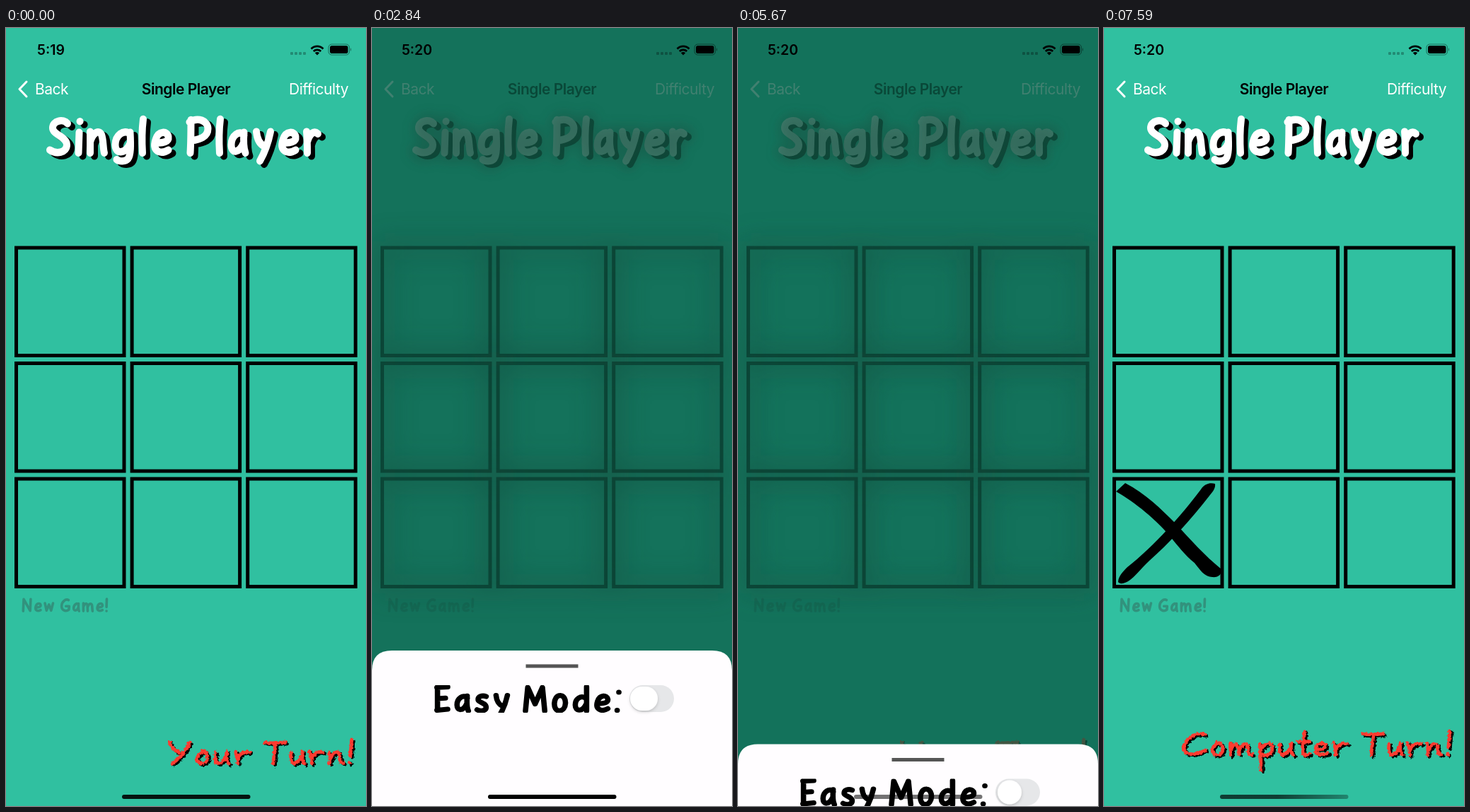
Animation, 509 px wide and 1101 px high, one loop 8 s. Source, as an HTML page:

```html
<!DOCTYPE html>
<html lang="en">
<head>
<meta charset="utf-8">
<title>Tic-tac-toe</title>
<style>
  html, body { margin: 0; width: 100%; height: 100%; overflow: hidden; background: #30c0a0; }
  svg { display: block; width: 100%; height: 100%; }
  text { font-family: Inter, "Open Sans", sans-serif; font-size: 21px; letter-spacing: -.5px; }
  .pen { fill: none; stroke-linecap: round; stroke-linejoin: round; }
</style>
</head>
<body>
<svg id="stage" viewBox="0 0 509 1101" xmlns="http://www.w3.org/2000/svg"></svg>
<script>
const LOOP = 8000, FPS = 12;

// Pen lettering: [width, centre line], baseline at 0
const MARKER = {
  S: [36, 'M30-45C24-52 9-49 9-39C9-30 29-27 29-16C29-5 14-3 5-9'],
  i: [11, 'M6-33L5-5M7-48h.1'],
  n: [31, 'M6-34V-5M6-20C10-33 18-37 22-30C25-22 24-12 26-5'],
  g: [34, 'M27-31C18-38 6-29 6-16C6-3 20-3 27-18M27-33C28-15 28-2 24 3C20 7 12 7 8 4'],
  l: [12, 'M7-51C5-35 5-20 6-5'],
  e: [31, 'M8-19C18-18 27-20 26-27C25-35 12-36 8-23C3-8 14-2 26-9'],
  P: [38, 'M8-50C8-35 8-20 7-5M6-47C18-54 32-49 32-38C32-27 20-23 9-22'],
  a: [31, 'M24-29C18-37 6-29 6-16C6-4 17-4 23-18M24-33C23-20 23-12 26-5'],
  y: [31, 'M6-34C7-24 11-17 17-14M26-34C23-20 18-6 11 6'],
  r: [27, 'M6-34C7-24 7-14 7-5M7-20C10-31 16-36 22-31'],
  N: [40, 'M6-5L8-49L32-6L34-49'],
  w: [42, 'M6-34L12-7L21-29L29-7L36-34'],
  G: [40, 'M32-46C20-52 6-38 6-24C6-6 24-2 33-10L34-23H22'],
  m: [46, 'M6-34V-5M6-20C10-33 18-36 21-28L22-5M22-20C27-33 35-36 38-27L40-5'],
  '!': [11, 'M6-50L5-20M5-5h.1'],
  E: [30, 'M7-50V-6M6-49L25-50M7-28L21-29M6-6L25-8'],
  s: [27, 'M21-32C14-35 6-32 7-25C9-20 21-20 21-12C21-5 12-3 5-7'],
  M: [46, 'M6-5L10-49L23-18L36-49L40-5'],
  o: [31, 'M16-34C3-34 2-5 14-5C28-5 29-33 16-34'],
  d: [32, 'M25-28C16-36 6-27 6-16C6-3 19-3 25-17M26-50L26-5'],
  ':': [14, 'M9-40h.1M6-6h.1'],
  ' ': [10, '']
};
const CHALK = {
  Y: [33, 'M2-33C5-25 10-20 16-18M31-32C24-18 15-8 6-2'],
  o: [20, 'M12-19C1-17-1-3 9-2C19-2 21-18 10-20'],
  u: [23, 'M3-18C1-6 4-1 9-3C15-5 18-12 19-19C18-10 19-4 22-2'],
  r: [24, 'M3-19C6-12 6-7 6-2M6-10C10-17 15-20 22-18'],
  T: [33, 'M2-32C12-30 20-32 31-32M17-31C16-20 14-10 14-2'],
  n: [25, 'M3-18C5-12 5-8 4-2M5-9C11-21 18-21 18-12C18-6 20-2 23-3'],
  '!': [9, 'M7-36L5-13M4-3h.1'],
  C: [36, 'M33-31C22-36 3-25 3-12C3 1 22-3 33-9'],
  m: [36, 'M3-18L4-2M4-9C8-20 15-21 16-3M17-10C22-21 28-20 28-12C28-6 30-2 34-3'],
  p: [25, 'M4-18C6 0 6 10 6 19M6-10C12-21 23-21 22-11C21-3 13 0 7-3'],
  t: [18, 'M10-35C8-20 6-5 9-3C11-1 14-2 17-4M1-21H17'],
  e: [21, 'M4-10C12-9 18-12 17-17C14-21 3-19 3-10C3-1 14-1 20-5']
};

function letter(word, font, gap) {
  let x = 0;
  return [...word].map(ch => {
    const [width, d] = font[ch];
    const glyph = `<path d="${d}" transform="translate(${x.toFixed(1)})"/>`;
    x += width + gap;
    return glyph;
  }).join('');
}
const pen = (marks, x, y, color, width, sx = 1, sy = sx) =>
  `<g class="pen" stroke="${color}" stroke-width="${width}" transform="translate(${x} ${y}) scale(${sx} ${sy})">${marks}</g>`;

function chalkLine(id, y, words) {
  const layer = (dx, dy, color) =>
    words.map(([word, x, gap]) => pen(letter(word, CHALK, gap), x + dx, y + dy, color, 4.8)).join('');
  const label = words.map(w => w[0]).join(' ');
  return `<g id="${id}" role="img" aria-label="${label}" filter="url(#rough)">${layer(2.5, 2, '#000')}${layer(0, 0, '#ff3b30')}</g>`;
}

const cells = Array.from({ length: 9 }, (_, i) =>
  `<rect x="${14.5 + 163.6 * (i % 3)}" y="${311 + 163.5 * Math.floor(i / 3)}" width="152.5" height="152.5"/>`).join('');
const titleMarks = letter('Single Player', MARKER, 4.5);
const title = (dx, dy, color, width) => pen(titleMarks, 57 + dx, 182 + dy, color, width, 1, 1.04);
const dots = [402, 408, 414, 420].map(x => `<rect x="${x}" y="34" width="4" height="4" rx="1"/>`).join('');

const stage = document.getElementById('stage');
stage.innerHTML = `
  <defs>
    <filter id="rough" x="-5%" y="-20%" width="110%" height="140%" color-interpolation-filters="sRGB">
      <feTurbulence type="fractalNoise" baseFrequency=".3" numOctaves="2" seed="4"/>
      <feDisplacementMap in="SourceGraphic" scale="5" xChannelSelector="R" yChannelSelector="G"/>
    </filter>
    <filter id="soft" filterUnits="userSpaceOnUse" x="-60" y="40" width="630" height="860">
      <feGaussianBlur stdDeviation="20"/>
    </filter>
    <filter id="halo" filterUnits="userSpaceOnUse" x="0" y="80" width="509" height="170">
      <feGaussianBlur stdDeviation="8"/>
    </filter>
    <filter id="lift" x="-30%" y="-30%" width="160%" height="170%">
      <feDropShadow dx="0" dy="2" stdDeviation="2" flood-opacity=".18"/>
    </filter>
    <linearGradient id="bar">
      <stop offset=".45"/>
      <stop id="barEnd" offset="1"/>
    </linearGradient>
    <clipPath id="line"><rect x="80" y="49" width="280" height="39"/></clipPath>
  </defs>
  <rect width="509" height="1101" fill="#30c0a0"/>
  <path d="M29 76L19 86.500L29 97" fill="none" stroke="#fff" stroke-width="3" stroke-linecap="round" stroke-linejoin="round"/>
  <text x="41" y="94" fill="#fff">Back</text>
  <text x="254.500" y="94" font-weight="600" text-anchor="middle">Single Player</text>
  <text x="484" y="94" fill="#fff" text-anchor="end">Difficulty</text>
  <g role="img" aria-label="Single Player">${title(6, 4.5, '#000', 10)}${title(0, 0, '#fff', 10)}</g>
  <g fill="none" stroke="#000" stroke-width="5">${cells}</g>
  <g id="cross">
    <path d="M17 656L30 644C58 658 82 682 100 700C122 724 146 750 165 765C168 774 160 778 153 777C141 776 137 768 128 757C114 746 104 732 93 719C74 696 45 672 17 656Z"/>
    <path d="M137 653C142 645 150 643 157 645C158 652 153 657 149 662C122 697 91 730 64 754C54 763 46 774 37 781C30 786 23 788 20 784C20 776 27 769 33 763C71 733 110 689 137 653Z"/>
  </g>
  <g role="img" aria-label="New Game!">${pen(letter('New Game!', MARKER, 5), 22, 827, '#32927d', 9.5, .38)}</g>
  ${chalkLine('yours', 1043, [['Your', 229, 5.6], ['Turn!', 364, 3.2]])}
  ${chalkLine('computers', 1031, [['Computer', 110, 4.7], ['Turn!', 364, 3.2]])}
  <g id="dim">
    <rect width="509" height="1101" fill="#0c5d48" opacity=".78"/>
    <g fill="none" stroke="#163c30" stroke-width="18" opacity=".38" filter="url(#soft)">${cells}</g>
    <g opacity=".34" filter="url(#halo)">${title(3, 2, '#1c4438', 22)}</g>
  </g>
  <g id="sheet">
    <path d="M0 240V28Q0 0 28 0H481Q509 0 509 28V240Z" fill="#fffdff"/>
    <rect x="217.500" y="19.500" width="74" height="5" fill="#555"/>
    <g role="img" aria-label="Easy Mode:" clip-path="url(#line)">${pen(letter('Easy Mode:', MARKER, 5.5), 87, 89, '#000', 9.5, .8, .75)}</g>
    <rect id="track" x="364" y="49" width="63" height="38" rx="19"/>
    <rect id="knob" y="51" height="34" rx="17" fill="#fff" filter="url(#lift)"/>
  </g>
  <text id="clock" x="63.500" y="38" font-weight="600" text-anchor="middle" style="font-size:19.500px;letter-spacing:0"></text>
  <g opacity=".27">${dots}</g>
  <path d="M431.500 29.500a12 12 0 0 1 17 0M434.800 33a7.500 7.500 0 0 1 10.400 0" fill="none" stroke="#000" stroke-width="2.800"/>
  <path d="M440 38.500l-3.200-3.300a4.600 4.600 0 0 1 6.400 0z"/>
  <rect x="456" y="23" width="29.500" height="15" rx="4.500" fill="none" stroke="#000" stroke-opacity=".45"/>
  <rect x="458" y="25" width="25.500" height="11" rx="2.800"/>
  <path d="M487 28q2 2.500 0 5z" opacity=".5"/>
  <rect id="home" x="164" y="1085" width="181.500" height="6" rx="3" fill="url(#bar)"/>`;

const [cross, yours, computers, dim, sheet, track, knob, clock, home, barEnd] =
  ['cross', 'yours', 'computers', 'dim', 'sheet', 'track', 'knob', 'clock', 'home', 'barEnd'].map(id => document.getElementById(id));

const mix = (a, b, k) => a + (b - a) * k;
const ease = (t, from, to) => {
  const u = Math.min(1, Math.max(0, (t - from) / (to - from)));
  return u * u * (3 - 2 * u);
};
// Critically damped spring from 0 to 1
const spring = (ms, rate) => {
  const u = Math.max(0, ms) / 1000 * rate;
  return u > 7 ? 1 : 1 - (1 + u) * Math.exp(-u);
};
const show = (node, on) => node.setAttribute('visibility', on ? 'visible' : 'hidden');

function draw(t) {
  const opened = spring(t - 420, 12);
  const closed = spring(t - 5667, 14.8);
  const drag = 157 * ease(t, 3920, 4480) - 24.5 * ease(t, 4480, 4720);
  const top = mix(mix(1101, 881, opened) + drag, 1102, closed);
  sheet.setAttribute('transform', `translate(0 ${top.toFixed(2)})`);
  dim.setAttribute('opacity', opened * (1 - closed));

  const off = ease(t, 2570, 2830);
  const press = ease(t, 2400, 2580) - ease(t, 2840, 3080);
  knob.setAttribute('x', mix(391 - 5 * press, 367 - 2 * press, off));
  knob.setAttribute('width', 34 + 5 * press);
  const tint = [[52, 230], [199, 231], [89, 233]].map(([a, b]) => Math.round(mix(a, b, off)));
  track.setAttribute('fill', `rgb(${tint})`);

  clock.textContent = t < 2000 ? '5:19' : '5:20';
  const moved = t >= 7583;
  show(cross, moved);
  show(computers, moved);
  show(yours, !moved);

  const faded = mix(mix(.9, 1, opened), .65, ease(t, 3920, 4580));
  home.setAttribute('opacity', faded - .1 * ease(t, 4580, 4750) + .13 * closed);
  barEnd.setAttribute('stop-opacity', 1 - .55 * closed);
}

const begin = performance.now();
function tick() {
  const t = (performance.now() - begin) % LOOP;
  draw(Math.floor(t * FPS / 1000) * 1000 / FPS + .5);
  requestAnimationFrame(tick);
}
tick();
</script>
</body>
</html>
```
